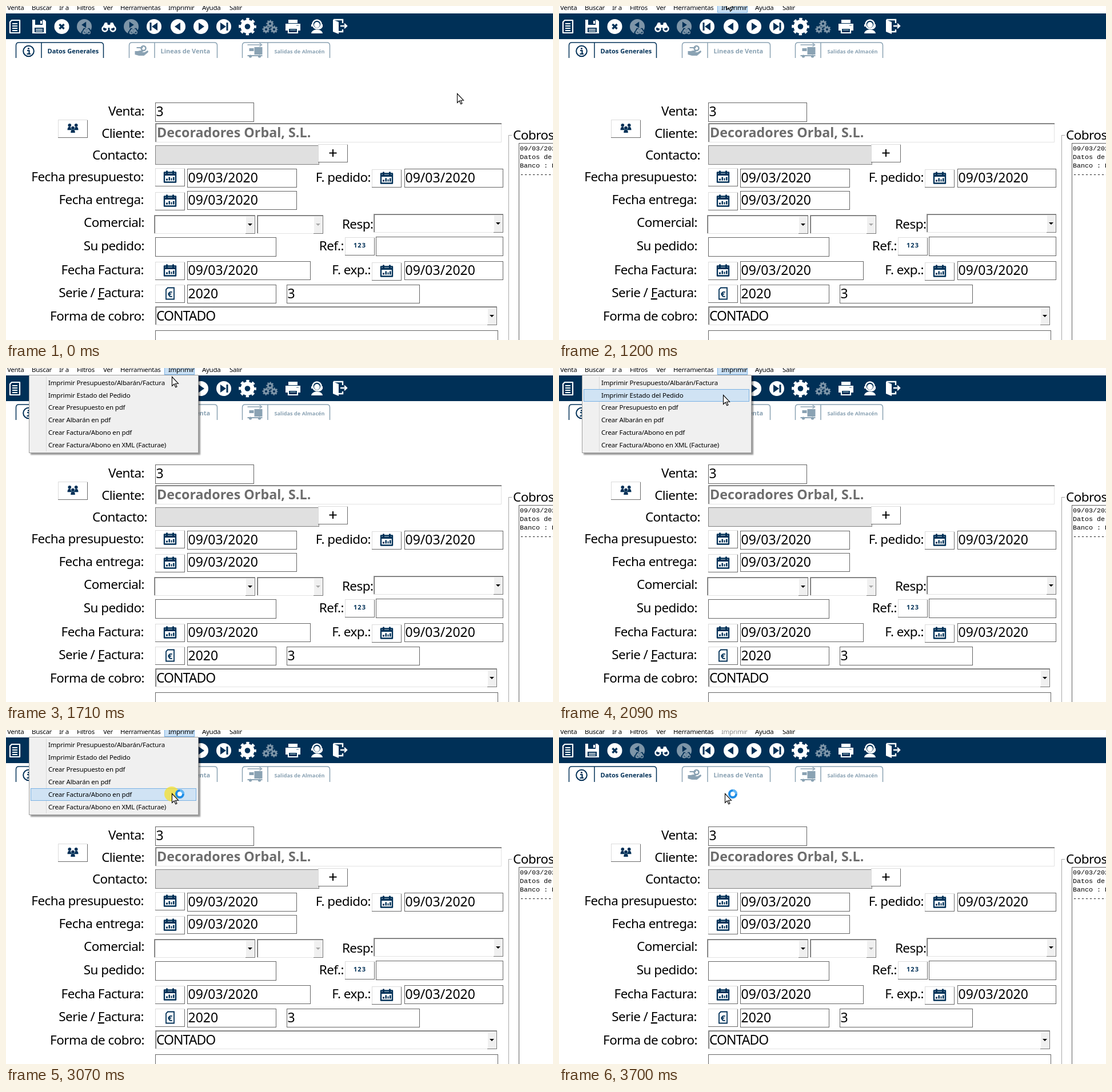
These frames come from a looping animation (957 by 585 pixels, 5.55 s). An HTML page:

```html
<!DOCTYPE html>
<html lang="es">
<head>
<meta charset="utf-8">
<title>Ventas</title>
<style>
html, body { margin: 0; width: 100%; height: 100%; overflow: hidden; background: #fff }
svg { display: block; width: 957px; height: 585px }
text { font-family: "Noto Sans", "Open Sans", sans-serif; white-space: pre }
rect, .crisp { shape-rendering: crispEdges }
.label { font-size: 22.5px; letter-spacing: -.55px; text-anchor: end }
.value { font-size: 23px }
.bar { font-size: 11.5px; letter-spacing: -.3px }
.item { font-size: 11.5px; letter-spacing: -.15px }
.tab { font: 700 11px "Open Sans", "Noto Sans", sans-serif }
.mono { font: 11.67px "Liberation Mono", "DejaVu Sans Mono", monospace }
#panel { filter: drop-shadow(3px 3px 1px rgba(0,0,0,.4)) }
</style>
</head>
<body>
<svg id="stage" viewBox="0 0 957 585"></svg>
<script>
const NAVY = '#003057', DIM = '#7d95a8', SOFT = '#8aa2b3';
const LOOP = 5550, ROW = 21.7;

const rect = (x, y, w, h, fill = '#fff', stroke = 'none') =>
  `<rect x="${x + .5}" y="${y + .5}" width="${w}" height="${h}" fill="${fill}" stroke="${stroke}"/>`;
const text = (cls, x, y, s, extra = '') => `<text class="${cls}" x="${x}" y="${y}" ${extra}>${s}</text>`;
const path = (d, fill = 'none', stroke = 'none', w = 1, extra = '') =>
  `<path d="${d}" fill="${fill}" stroke="${stroke}" stroke-width="${w}" ${extra}/>`;
const disc = (x, y, r, fill, stroke = 'none', w = 1, extra = '') =>
  `<circle cx="${x}" cy="${y}" r="${r}" fill="${fill}" stroke="${stroke}" stroke-width="${w}" ${extra}/>`;
const at = (x, y, s, scale = 1) => `<g transform="translate(${x} ${y}) scale(${scale})">${s}</g>`;
const crisp = (d, color) => path(d, 'none', color, 1, 'class="crisp"');

const field = (x, y, w, h, s = '', base = y + 24) =>
  rect(x, y, w, h, '#fff', '#646464') + text('value', x + 1.5, base, s);
const sunken = (x, y, w, h) => rect(x, y, w, h, '#fff', '#e3e3e3') +
  crisp(`M${x + .5} ${y + h}v${-h + .5}h${w}`, '#a0a0a0') +
  crisp(`M${x + 1.5} ${y + h}v${-h + 1.5}h${w - 1}`, '#696969');
const button = (x, y, icon, w = 51, h = 31) =>
  rect(x, y, w, h, '#fff', '#dcdcdc') + crisp(`M${x} ${y + h + .5}h${w + .5}v${-h}`, '#696969') +
  at(x + w / 2 + .5, y + h / 2, icon);
const combo = (x, y, w, h, s = '', arrow = '#000') => sunken(x, y, w, h) +
  rect(x + w - 16, y + 2, 15, h - 2, '#f0f0f0') +
  crisp(`M${x + w - 16} ${y + h}h16.5v${-h + 2}`, '#787878') +
  path(`M${x + w - 12} ${y + h / 2 - 1}h8l-4 4z`, arrow) + text('value', x + 2, y + 25, s, 'letter-spacing="-1"');

// toolbar and button icons, each around its own centre
const gear = (r, color) => disc(0, 0, r * .56, 'none', color, r * .48) +
  disc(0, 0, r * .86, 'none', color, r * .32, `stroke-dasharray="${r * .3378}" stroke-dashoffset="${r * .169}"`);
const binoculars = color => disc(-7, 4, 4.4, 'none', color, 2.8) + disc(7, 4, 4.4, 'none', color, 2.8) +
  path('M-11 1L-7 -7h4l1 4h4l1 -4h4L11 1L3 4V2h-6v2z', color);
const arrowLeft = path('M-6 0L4 -7V7z', NAVY), arrowRight = path('M6 0L-4 -7V7z', NAVY);
const stop = x => path(`M${x} -7V7`, 'none', NAVY, 3);
const round = (icon, color = '#fff') => disc(0, 0, 13, color) + icon;
const sheet = path('M-6 -11H8V11H-9V-8z', 'none', '#fff', 2.2, 'stroke-linejoin="round"') +
  path('M-5 -5H4M-5 -1H4M-5 3H4M-5 7H4', 'none', '#fff', 1.8);
const floppy = path('M-12 -12H9L12 -9V12H-12z', '#fff') + path('M-7 -12H6V-3H-7zM-8 2H8V10H-8z', NAVY) +
  path('M2 -10h3v5h-3zM-6 4H6v1.5H-6zM-6 7H6v1.5H-6z', '#fff');
const cross = path('M-4 -4L4 4M4 -4L-4 4', 'none', NAVY, 3.4);
const find = arrow => round(at(0, -3, arrow, .8), DIM) +
  at(4, 8, binoculars(NAVY), .75) + at(4, 8, binoculars(DIM), .55);
const gears = at(0, -5, gear(6.5, DIM)) + at(-7, 5, gear(6.5, DIM)) + at(7, 5, gear(6.5, DIM));
const printer = path('M-8 -12H8V-6H-8zM-13 -5H13V7H9V2H-9V7H-13z', '#fff') +
  path('M-8 3H8V11H-8z', 'none', '#fff', 2.2) + path('M-5 6H5M6 -2H10', 'none', SOFT, 1.6);
const agent = disc(0, -4, 7.5, 'none', '#fff', 2.5) + disc(0, -3, 5, '#fff') +
  path('M-10 12C-9 3 9 3 10 12z', '#fff') + path('M-9 -4v4M9 -4v4q-2 4 -7 4', 'none', '#fff', 2);
const door = path('M-10 -12H6V-6M6 5V9H-2', 'none', '#fff', 2.4) + path('M-11 -12L-1 -8V13L-11 9z', '#fff') +
  path('M2 -1H12M9 -5L13 -1L9 3', 'none', '#fff', 2.4);
const calendar = path('M-10 -8H10V9H-10z', 'none', NAVY, 2.4, 'stroke-linejoin="round"') +
  path('M-10 -6H10V-2.500H-10zM-7 -11h3v5h-3zM4 -11h3v5h-3zM-7 3h3v3h-3zM-2.500 0h2.500v6h-2.500zM1.500 2h2v4h-2zM5 0h2.500v6h-2.500z', NAVY);
const person = (x, y) => disc(x, y, 3, NAVY) + path(`M${x - 4} ${y + 9}q0 -6 4 -6t4 6z`, NAVY);
const people = at(0, -1, person(-6, -5) + person(6, -5) + disc(0, -1, 4, '#fff') + person(0, 0), .95);
const bill = path('M-4 -10H7V10H-7V-7z', 'none', NAVY, 1.8) +
  text('', 0, 6, '€', `font-size="15" font-weight="700" text-anchor="middle" fill="${NAVY}"`);
const plus = path('M-6.500 0H6.500M0 -6.500V6.500', 'none', '#000', 2);
const digits = text('', 0, 2, '123', `font-size="11" font-weight="700" letter-spacing="1" text-anchor="middle" fill="${NAVY}"`);

const info = disc(0, 0, 9.3, 'none', NAVY, 2) + disc(0, -4.5, 1.6, NAVY) +
  path('M-2.500 -1H1V5M-3 5H3.500', 'none', NAVY, 2.2);
const hand = disc(3, -5, 4, 'none', SOFT, 2.6) + path('M-9 -6H2', 'none', SOFT, 2) +
  path('M-12 0h5l4 -1h5q2 2 -2 3h5l5 -3q3 1 0 4l-6 5h-9l-7 -2z', SOFT);
const truck = path('M-13 -11H10M8 -14L12 -11L8 -8', 'none', SOFT, 1.5) +
  path('M-1 -7H13V6H-1zM-13 0h11v-5h-8v5h-3v9h26v-2h-26z', SOFT) + disc(-8, 9, 2.6, SOFT) + disc(8, 9, 2.6, SOFT);
const tab = (x, w, color, icon, label, size = 11) =>
  path(`M${x + .5} 91V69q0 -5 5 -5h${w - 11}q5 0 5 5V91M${x + 45} 64V91`, 'none', color, 1.5) +
  at(x + 22.5, 79, icon) + text('tab', x + (size < 11 ? 56.5 : 55.5), 83, label, `fill="${color}" style="font-size:${size}px"`);

const icons = [[16, sheet], [58, floppy], [97.5, round(cross)], [137, find(arrowLeft)], [180, binoculars('#fff')],
  [219, find(arrowRight)], [259, round(at(2, 0, arrowLeft) + stop(-6))], [301, round(arrowLeft)],
  [341, round(arrowRight)], [381, round(at(-2, 0, arrowRight) + stop(6))], [422.5, gear(15, '#fff')],
  [462, gears], [502, printer], [544, agent], [583, door]];
const bar = [[2, 'Venta'], [45, 'Buscar'], [93, 'Ir a'], [124, 'Filtros'], [170, 'Ver'],
  [200, 'Herramientas'], [343, 'Ayuda'], [391, 'Salir']];
const labels = [[242, 192, 'Venta:'], [242, 231, 'Cliente:'], [247, 269, 'Contacto:'], [241, 307, 'Fecha presupuesto:'],
  [241, 347, 'Fecha entrega:'], [242, 387, 'Comercial:'], [242, 428, 'Su pedido:'], [241, 470, 'Fecha Factura:'],
  [241, 510, 'Serie / <tspan text-decoration="underline">F</tspan>actura:'], [242, 551, 'Forma de cobro:'],
  [638, 308, 'F. pedido:'], [642.5, 390, 'Resp:'], [591, 428, 'Ref.:'], [638, 470, 'F. exp.:']];
const items = ['Imprimir Presupuesto/Albarán/Factura', 'Imprimir Estado del Pedido', 'Crear Presupuesto en pdf',
  'Crear Albarán en pdf', 'Crear Factura/Abono en pdf', 'Crear Factura/Abono en XML (Facturae)'];
const date = '09/03/2020';
const item = i => text('item', 74, 30 + i * ROW, items[i]);
const glow = (id, y) => `<rect id="${id}" x="43.5" y="${y}" width="289" height="21" fill="#d0e3f4" stroke="#7bb2e4"/>`;

stage.innerHTML = [
  rect(-.5, 12.5, 957, 45, NAVY),
  '<rect id="hot" x="277.5" y="-2" width="52" height="13" fill="#c9e0f5" stroke="#7bb2e4"/>',
  ...bar.map(([x, s]) => text('bar', x, 7, s)), text('bar', 284, 7, 'Imprimir', 'id="print"'),
  ...icons.map(([x, s]) => at(x, 36, s)),
  tab(17, 154, NAVY, info, 'Datos Generales'),
  tab(215, 155, SOFT, hand, 'Lineas de Venta'),
  tab(413, 154, SOFT, truck, 'Salidas de Almacén', 9.2),
  ...labels.map(([x, y, s]) => text('label', x, y, s)),
  field(261, 169, 172, 33, '3'), button(91, 199, people),
  sunken(261, 205, 605, 33),
  text('', 264, 230, 'Decoradores Orbal, S.L.', 'font-size="23.3" font-weight="700" fill="#6d6d6d"'),
  rect(261, 244, 286, 33, '#e0e0e0', '#808080'), button(546, 242, plus),
  button(261, 284, calendar), field(317, 285, 191, 32, date), button(640, 286, calendar), field(697, 285, 172, 32, date),
  button(261, 326, calendar), field(317, 324, 191, 32, date),
  combo(259, 366, 176, 32), combo(439, 366, 115, 32, '', '#a8a8a8'), combo(643, 364, 226, 32),
  field(261, 405, 211, 33), button(593, 405, digits), field(647, 404, 222, 33),
  button(261, 448, calendar), field(317, 447, 215, 32, date), button(640, 449, calendar), field(697, 447, 172, 32, date),
  button(261, 488, bill), field(317, 488, 155, 32, '2020'), field(491, 488, 232, 32, '3'),
  combo(261, 526, 597, 32, 'CONTADO'), field(261, 568, 599, 33),
  crisp('M885 226.5H879.5V585', '#a8a8a8'), text('label', 887, 234, 'Cobros', 'style="text-anchor:start"'),
  crisp('M957 240.5H897.5V585', '#606060'),
  ...[date, 'Datos de', 'Banco : E', '----------'].map((s, i) => text('mono', 899, 253 + i * 15, s)),
  '<g id="menu"><g id="panel">', rect(40, 12, 296, 136, '#f0f0f0', '#a0a0a0'), '</g>',
  crisp('M70.5 15V146', '#dadada'), glow('hover', 15.5), ...items.map((_, i) => item(i)), '</g>',
  '<g id="picked">', glow('pickedBox', 102.5), item(4), '</g>',
  '<g id="cursor">', disc(0, 1, 13, '#f5e02c', 'none', 1, 'id="click" opacity=".75"'),
  '<g id="busy">', disc(14, 1, 6, '#fff', '#1e8de6', 4),
  path('M14 -5A6 6 0 0 1 20 1', 'none', '#62b6f4', 4), '</g>',
  path('M.5 .5V16.500L4.200 13L6.800 18.700L9 17.700L6.500 12.200H11.500z', '#fff', '#000', 1.1), '</g>'
].join('');

// [start, interval, count] of the picture updates
const beats = [[360, 65, 9], [930, 67.5, 5], [1370, 68, 6], [2010, 61.1, 10], [2630, 130, 2], [3070, 62, 6], [3700, 1, 1]];
const snap = t => beats.reduce((s, [start, gap, n]) =>
  t < start ? s : start + gap * Math.min(n - 1, Math.floor((t - start) / gap + .1)), 0);

// [time, x, y] of the pointer tip
const route = [[0, 789, 153], [300, 789, 153], [360, 778, 157], [490, 700, 162], [620, 560, 130], [815, 370, 69],
  [880, 349, 53], [1200, 293, -10], [1642, 293, -10], [1710, 290, 15], [2010, 289, 26], [2071, 287, 47],
  [2437, 286, 102], [2560, 287, 104], [2630, 287, 104], [2760, 290, 111], [LOOP, 290, 111]];
function pointer(t) {
  const i = route.findIndex(k => k[0] > t), [t0, x0, y0] = route[i - 1], [t1, x1, y1] = route[i];
  const p = (t - t0) / (t1 - t0);
  return [Math.round(x0 + (x1 - x0) * p), Math.round(y0 + (y1 - y0) * p)];
}

const $ = id => document.getElementById(id);
const fade = (id, a) => $(id).setAttribute('opacity', Math.max(0, Math.min(1, a)));
const show = (id, on) => $(id).setAttribute('display', on ? 'inline' : 'none');

function draw(now) {
  const s = snap(now % LOOP), [x, y] = pointer(s);
  $('cursor').setAttribute('transform', `translate(${x} ${y})`);
  show('busy', s >= 2630);
  show('click', s >= 1370 && s < 1640 || s >= 3070 && s < 3250);
  show('hot', s > 1100 && s < 3120);
  $('print').setAttribute('fill', s >= 3700 ? '#8a8a8a' : '#000');
  fade('menu', s < 3120 ? (s - 1505) / 205 : 0);
  show('hover', s >= 2010);
  $('hover').setAttribute('y', 15.5 + Math.round(Math.floor((y - 15) / ROW) * ROW));
  fade('picked', s > 3120 ? (3380 - s) / 310 : 0);
  requestAnimationFrame(draw);
}
draw(performance.now());
</script>
</body>
</html>
```
